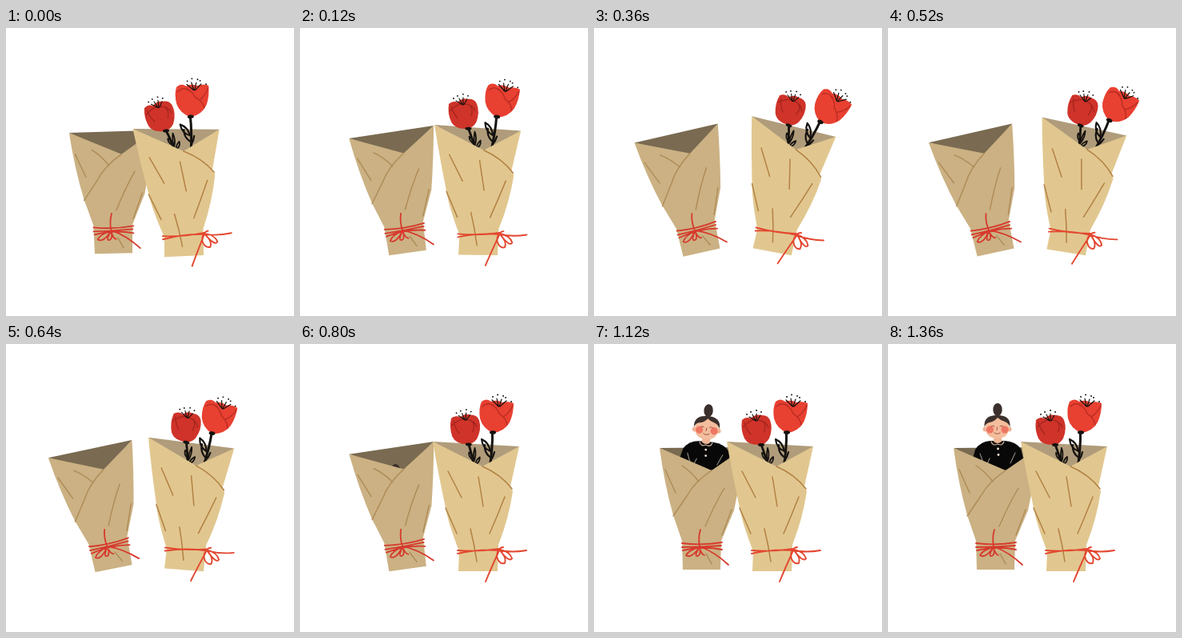
An HTML page for the animation above (2000 ms loop, 360 px wide and 360 px high).

```html
<!DOCTYPE html>
<html lang="en">
<head>
<meta charset="utf-8">
<title>Two bouquets</title>
<style>
  html, body { margin: 0; width: 100%; height: 100%; overflow: hidden; background: #fff; }
  svg { display: block; width: 100%; height: 100%; }
  path { stroke-linecap: round; stroke-linejoin: round; }
  .line { fill: none; }
  .ink { fill: none; stroke: #15120f; }
</style>
</head>
<body>
<svg viewBox="0 0 360 360">
  <clipPath id="opening"><rect width="360" height="168"/></clipPath>

  <g id="left">
    <path fill="#796a51" d="M82 130L189 129L147 162Z"/>
    <g clip-path="url(#opening)">
      <g id="woman">
        <path fill="#090808" d="M128 121Q115 122 109 132L102 158L112 176H160L172 156L166 131Q160 122 146 121Z"/>
        <path class="line" stroke="#cfc6bb" stroke-width=".8" d="M115 137L120 151M159 136L153 149M127 143L124 150"/>
        <path fill="#efb595" d="M132 113H142V122Q137 126 132 122Z"/>
        <path class="line" stroke="#d9b9a0" stroke-width="1.2" d="M129 122Q131 128 137 125Q143 128 145 122"/>
        <circle cx="137.500" cy="131" r="1.400" fill="#f3e6d5"/>
        <circle cx="138" cy="138.500" r="1.400" fill="#f3e6d5"/>
        <ellipse cx="137" cy="82" rx="5.700" ry="8" fill="#3b302c"/>
        <circle cx="121.500" cy="106.500" r="3" fill="#f0b394"/>
        <circle cx="151.500" cy="106.500" r="3" fill="#f0b394"/>
        <path fill="#f4bd9d" d="M122 102Q122 91 136.500 91Q151 91 151 102Q152 118 136.500 118Q121 118 122 102Z"/>
        <circle cx="127.500" cy="107" r="4.600" fill="#ee7763"/>
        <circle cx="146" cy="107" r="4.600" fill="#ee7763"/>
        <path fill="#3b302c" d="M120.500 104Q119 89 136.500 89Q154 89 152.500 104Q151 99 146 97Q140 95 137 92Q133 97 127 98Q122 99 120.500 104Z"/>
        <path class="line" stroke="#8b4a3c" stroke-width=".9" d="M129 103Q131 101 133 103M140 103Q142 101 144 103M136.500 104L136 107.500M133 111Q136.500 114 140 111"/>
      </g>
    </g>
    <path fill="#cbb183" d="M82 130L147 158L189 129Q183 170 175 208L159 246L158 282H111L110 246L99 214Q88 175 82 130Z"/>
    <path class="line" stroke="#ae8b57" stroke-width="1.400" d="M147 158Q126 172 116 190L99 215M89 157L102 186M110 152Q121 159 131 172M163 180Q151 200 139 228M172 207L160 239M140 262L147 275"/>
    <path class="line" stroke="#d63a2d" stroke-width="1.800" d="M110 249Q135 252 160 248M110 254Q135 254 159 252M111 258Q136 252 160 257M133 232Q130 242 132 253Q151 260 168 276M132 254Q119 257 115 264Q121 269 132 254Q124 266 130 265Q134 263 132 254Q134 263 138 264"/>
  </g>

  <g id="right">
    <path fill="#b09c7b" d="M166 122L274 128L228 160Z"/>
    <g id="small">
      <path class="ink" stroke-width="2.800" d="M209 126Q214 138 218 156"/>
      <path class="ink" stroke-width="1.800" d="M216 145Q210 142 210 136Q215 138 216 145M217 147Q215 140 217 130Q220 138 217 147M219 151Q219 145 224 141Q225 147 219 151"/>
      <path fill="#cf3329" d="M208 126Q193 127 188 118Q183 107 185 95Q190 90 196 93Q202 87 208 89Q217 88 220 95Q224 106 219 118Q215 125 208 126Z"/>
      <path class="line" stroke="#a3241e" stroke-width="1.200" d="M186 104Q196 94 203 95Q214 95 218 104M188 98Q191 108 196 113M210 96Q216 100 213 110"/>
      <path class="ink" stroke-width="1.100" d="M202 96L194 91M202 96L198 88M203 96L203 87M204 96L208 89"/>
      <path class="ink" stroke-width="1.800" d="M191 88h.1M196 85h.1M203 83h.1M209 85h.1"/>
      <ellipse cx="209" cy="126" rx="4" ry="2" fill="#15120f"/>
    </g>
    <g id="big">
      <path class="ink" stroke-width="3" d="M240.500 110Q241 128 237 156"/>
      <path class="ink" stroke-width="2.200" d="M238 134Q228 130 227 119Q236 123 238 134M237 141Q230 135 231 126M238 146Q242 141 243 135"/>
      <path fill="#e84031" d="M241 111Q228 105 225 93Q223 80 227 72Q233 67 239 72Q246 69 253 73Q261 71 267 74Q267 87 262 98Q255 110 241 111Z"/>
      <path class="line" stroke="#b62b21" stroke-width="1.300" d="M239 76Q246 79 249 87Q258 93 259 101M266 77Q261 87 254 91M228 78Q235 72 242 77"/>
      <path class="ink" stroke-width="1.200" d="M248 78L240 70M248 78L246 68M249 78L252 69M250 78L258 71"/>
      <path class="ink" stroke-width="1.800" d="M241 66h.1M247 63.500h.1M254 65h.1M257 67h.1M264 72h.1"/>
      <ellipse cx="241" cy="110.500" rx="4" ry="2.300" fill="#15120f"/>
    </g>
    <path fill="#e1c78f" d="M166 122L228 153L274 128L263 178L266 184Q261 218 248 251L247 284H198L199 259Q185 224 181 200Q172 158 166 122Z"/>
    <path class="line" stroke="#b38144" stroke-width="1.500" d="M228 153Q251 163 265 181M185 159L202 192M223 166L229 203M256 191Q247 214 237 237M182 205L196 237M213 231Q218 251 221 272"/>
    <path class="line" stroke="#e3472f" stroke-width="1.900" d="M197 258Q223 260 249 256M197 262Q224 256 249 258Q266 261 283 258M249 257Q262 259 265 268Q262 274 249 257Q259 267 256 274Q249 276 246 266Q246 260 249 257Q251 254 254 254M249 258Q239 280 232 297"/>
  </g>
</svg>
<script>
const LOOP = 2000, STEP = 40;
const $ = id => document.getElementById(id);

// Smooth curve through [time, value] keys, without overshoot.
function track(...keys) {
  const slope = i => (keys[i + 1][1] - keys[i][1]) / (keys[i + 1][0] - keys[i][0]);
  const tangent = i => {
    if (i === 0 || i === keys.length - 1) return 0;
    const a = slope(i - 1), b = slope(i);
    return a * b > 0 ? 2 * a * b / (a + b) : 0;
  };
  return t => {
    if (t <= keys[0][0]) return keys[0][1];
    const i = keys.findIndex(k => k[0] > t) - 1;
    if (i < 0) return keys[keys.length - 1][1];
    const [t0, v0] = keys[i], [t1, v1] = keys[i + 1];
    const d = t1 - t0, u = (t - t0) / d, w = 1 - u;
    return v0 * w * w * (1 + 2 * u) + v1 * u * u * (3 - 2 * u)
      + d * u * w * (tangent(i) * w - tangent(i + 1) * u);
  };
}

const parts = [
  { el: $('left'), pivot: '128 281',
    turn: track([0, -1.2], [80, -6], [200, -11], [420, -12.6], [640, -11.5], [800, -8], [960, -3.2], [1110, 0]) },
  { el: $('right'), pivot: '245 283',
    turn: track([0, -2.7], [200, 4.3], [360, 10.7], [420, 11.6], [640, 4.2], [800, 0]) },
  { el: $('big'), pivot: '236 152',
    turn: track([0, -2.8], [200, 9.5], [360, 15], [420, 15.6], [640, 5.5], [800, 0]) },
  { el: $('small'), pivot: '218 152',
    turn: track([0, -3.5], [200, 1], [360, 10], [480, 13.5], [640, 10], [800, 4], [1000, 0]) },
  { el: $('woman'), pivot: '136 160',
    turn: track([800, 0], [1020, 5], [1120, 4.5], [1340, 0]),
    drop: track([700, 88], [800, 76], [940, 32], [1080, 3], [1160, 0]) }
];

function draw(now) {
  const t = Math.floor(now % LOOP / STEP) * STEP;
  for (const { el, pivot, turn, drop } of parts) {
    const y = drop ? drop(t) : 0;
    el.setAttribute('transform', `translate(0 ${y}) rotate(${turn(t)} ${pivot})`);
  }
}

const start = performance.now();
function tick() {
  draw(performance.now() - start);
  requestAnimationFrame(tick);
}
tick();
</script>
</body>
</html>
```
